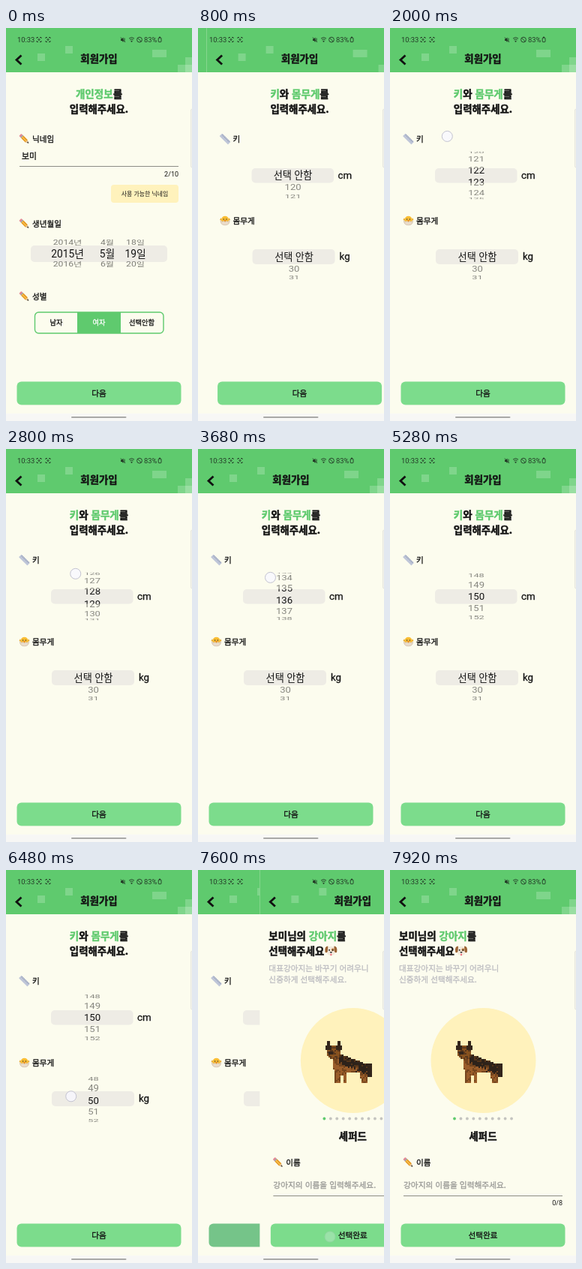
An HTML page that plays this animation: 248 px wide and 524 px high, repeating every 8000 ms.

```html
<!DOCTYPE html>
<html lang="ko">
<head>
<meta charset="utf-8">
<style>
html, body { margin: 0; width: 100%; height: 100%; overflow: hidden; background: #fcfcee; }
svg { display: block; width: 248px; height: 524px; font-family: "Noto Sans CJK KR", "Noto Sans CJK", sans-serif; }
text { stroke-width: 0; stroke-linejoin: round; }
.num { font-family: Roboto, "Noto Sans CJK KR", "Noto Sans CJK", sans-serif; }
.mid { text-anchor: middle; }
.end { text-anchor: end; }
.semi { stroke-width: .3px; }
.heavy { font-weight: 700; stroke-width: .45px; }
</style>
</head>
<body>
<svg id="stage" viewBox="0 0 248 524"></svg>
<script>
const LOOP = 8000, GREEN = '#5fca6e', BUTTON = '#7cdc8c', PRESSED = '#75c489';
const INK = '#141414', PALE = '#fff2bc', BOX = '#eeece5';
const stage = document.getElementById('stage');
const el = id => document.getElementById(id);
const clamp = v => Math.min(1, Math.max(0, v));
const easeOut = (v, power) => 1 - (1 - clamp(v)) ** power;
const range = (n, fn) => Array.from({ length: n }, (_, i) => fn(i)).join('');

const text = (x, y, size, str, cls = '', fill = INK) =>
  `<text x="${x}" y="${y}" font-size="${size}" class="${cls}" fill="${fill}" stroke="${fill}">${str}</text>`;
const accent = str => `<tspan fill="${GREEN}" stroke="${GREEN}">${str}</tspan>`;
const rect = (x, y, w, h, fill, r = 0, attrs = '') =>
  `<rect x="${x}" y="${y}" width="${w}" height="${h}" rx="${r}" fill="${fill}" ${attrs}/>`;
const path = (d, fill, attrs = '') => `<path d="${d}" fill="${fill}" ${attrs}/>`;
const dot = (x, y, r, fill) => `<circle cx="${x}" cy="${y}" r="${r}" fill="${fill}"/>`;

// Small pictures
const pencil = y => `<g transform="translate(24.5 ${y}) rotate(45)">
  ${rect(-8, -2.2, 3, 4.4, '#e58a94', 1)}${rect(-5.5, -2.2, 1.5, 4.4, '#9aa3ab')}${rect(-4, -2.2, 8, 4.4, '#e5951f')}
  ${rect(-4, -.6, 8, 1.4, '#f9c552')}${path('M4-2.2L8 0L4 2.2Z', '#e0bf94')}${path('M6-1.1L8.3 0L6 1.1Z', '#222')}</g>`;
const ruler = `<g transform="translate(24.5 148) rotate(45)">${rect(-8, -2.5, 16, 5, '#bfc6d8', .5)}
  ${range(7, i => rect(-6.3 + 2 * i, -2.5, .6, 2, '#7b86a2'))}</g>`;
const chick = dot(24.5, 255.5, 4.8, '#f9bd33') + dot(22.6, 255, .7, '#333') + dot(26.4, 255, .7, '#333') +
  path('M23.3 256.3h2.4l-1.2 1.8Z', '#e5681d') + path('M19 253l-1.5 3 3 1ZM30 253l1.5 3-3 1Z', '#e9a827') +
  path('M18.5 257l2 1.6 2-1.4 2 1.4 2-1.4 2 1.4 2-1.6q0 5.8-6 5.8t-6-5.8', '#eadccb', 'stroke="#bfa78c" stroke-width=".5"');
const puppy = dot(95, 108, 6.2, '#f3eadc') + path('M91 101.5q-5 0-3.8 8 2 2 3.3-1ZM99 101.5q5 0 3.8 8-2 2-3.3-1Z', '#9a6233') +
  dot(97.4, 106.3, 2, '#c98f52') + dot(92.7, 106.8, 1, '#222') + dot(97.3, 106.8, 1, '#222') +
  path('M93.2 109h3.6l-1.8 2Z', '#222') + rect(94, 111.4, 2, 2.8, '#ee6b7b', 1);

// Shepherd on a grid of 2px cells: sloping back, dark saddle, tan chest and legs
function shepherd() {
  let out = '', seed = 7;
  const noise = () => (seed = seed * 16807 % 2147483647) / 2147483647;
  const cell = (x, y) => {
    const grain = noise(), back = 8 + Math.max(0, x - 9) * .38;
    const ear = y < 6 && Math.min(Math.abs(x - 1.5), Math.abs(x - 8.5)) <= .5 + y / 3;
    const head = ((x - 5) / 5) ** 2 + ((y - 7) / 4.4) ** 2 < 1;
    const belly = x < 14 ? 22 : 20;
    const body = x > 4 && x < 30 && y >= back && y <= belly && x > 4 + (y - 16) / 3;
    const front = (x > 5 && x < 10) || (x > 11 && x < 14);
    const hind = x > 22 + Math.max(0, y - 22) / 3 && x < 28;
    const leg = y > 18 && y < 28 && (front || hind);
    const tail = x > 27 && x < 31 && y > 14 && y < 24;
    if (!(ear || head || body || leg || tail)) return '';
    if (ear || tail || (head && Math.abs(x - 3) < 1.5 && y > 6 && y < 9)) return '#33251b';
    if (head) return grain < .3 ? '#5a381d' : '#87521f';
    if (x > 8 && y < back + 4 + 4 * grain) return grain < .25 ? '#553519' : '#2d221a';
    return grain < .35 ? '#74451e' : '#9a5d2a';
  };
  for (let y = 0; y < 28; y++) for (let x = 0; x < 31; x++) {
    const fill = cell(x, y);
    if (fill) out += rect(88 + 2 * x, 228 + 2 * y, 2, 2, fill);
  }
  return `<g shape-rendering="crispEdges">${out}</g>`;
}

// Screens
const tile = (x, y, w, h) => rect(x, y, w, h, '#fff', 0, 'opacity=".2"');
const screen = (id, action, content) => `<g id="${id}">${rect(0, 0, 248, 524, '#fcfcee')}${rect(0, 0, 248, 59, GREEN)}
  ${tile(42, 34, 10, 10)}${tile(79, 24, 10, 10)}${tile(195, 29, 19, 10)}${tile(229, 49, 19, 10)}${tile(239, 39, 9, 20)}
  ${path('M20.5 36.5L14 42.5L20.5 48.5', 'none', 'stroke="#111" stroke-width="2.8"')}
  ${text(124, 45.7, 13.4, '회원가입', 'mid heavy')}${content}
  ${rect(14.5, 471.5, 219, 31, BUTTON, 6, `id="${id}Button"`)}${text(124, 491, 10.6, action, 'mid semi')}</g>`;
const heading = (a, b, x = 124, cls = 'mid heavy') => text(x, 92.8, 13.5, a, cls) + text(x, 112.8, 13.4, b, cls);
const label = (y, str) => text(35, y, 10.6, str, 'semi');
const rule = y => rect(18, y, 212, 1, '#8d8d86');
const counter = (y, str) => text(230, y, 9, str, 'end num');
const dateColumn = (x, value, unit) => range(3, i => `<g transform="translate(${x} ${286 + i * 14.7}) ${i === 1 ? '' : 'scale(.88 .6)'}"
  opacity="${i === 1 ? 1 : .55}">${text(0, 4.9, 13.8, value + i - 1 + unit, 'mid num')}</g>`);
const choice = (i, str) => text(67 + 57 * i, 396, 9.2, str, 'mid semi', i === 1 ? '#fff' : INK);

const profile = heading(accent('개인정보') + '를', '입력해주세요.') +
  pencil(148) + label(152, '닉네임') + text(21, 175, 10.8, '보미', 'semi') + rule(184) + counter(198, '2/10') +
  rect(140, 209, 90, 24, PALE, 4) + text(185, 224, 7.9, '사용 가능한 닉네임', 'mid') +
  pencil(261) + label(265, '생년월일') + rect(33, 290, 182, 22, BOX, 5) +
  dateColumn(82, 2015, '년') + dateColumn(135, 5, '월') + dateColumn(172.5, 19, '일') +
  pencil(358) + label(362, '성별') + rect(38.5, 379, 171.5, 28, 'none', 5, `stroke="${GREEN}" stroke-width="1.4"`) +
  rect(95, 379, 58, 28, GREEN) + ['남자', '여자', '선택안함'].map((str, i) => choice(i, str)).join('');

const size = heading(`${accent('키')}와 ${accent('몸무게')}를`, '입력해주세요.') +
  ruler + label(152, '키') + rect(60, 187, 109.5, 19.5, BOX, 5) + text(175, 201, 13.3, 'cm', 'num semi') +
  chick + label(261, '몸무게') + rect(61, 295, 110, 20, BOX, 5) + text(177, 309, 13.3, 'kg', 'num semi') +
  '<g id="height" transform="translate(115 196.5)"></g><g id="weight" transform="translate(116.5 305)"></g>';

const pet = heading(`보미님의 ${accent('강아지')}를`, '선택해주세요', 12, 'heavy') + puppy +
  text(12, 135, 10.65, '대표강아지는 바꾸기 어려우니', 'semi', '#bdbdc1') +
  text(12, 150, 10.65, '신중하게 선택해주세요.', 'semi', '#bdbdc1') +
  dot(124.5, 254, 70, PALE) + shepherd() + range(10, i => dot(86 + i * 8.45, 331.5, 1.9, i ? '#c4c4c0' : GREEN)) +
  text(124, 360, 13.4, '셰퍼드', 'mid heavy') + pencil(390) + label(394, '이름') +
  text(18, 424, 10.7, '강아지의 이름을 입력해주세요.', 'semi', '#9b9b98') + rule(434) + counter(447, '0/8');

const scanIcon = x => path(`M${x - 3} 14v-1.5h2M${x + 1} 12.5h2V14M${x + 3} 17v1.5h-2M${x - 1} 18.5h-2V17`, 'none') + dot(x, 15.5, 1, 'none');
const status = `<g opacity=".8">${text(15, 19, 9.4, '10:33', 'num')}${text(184, 19, 9.4, '83%', 'num')}
  <g stroke="${INK}" stroke-width=".9">${scanIcon(44)}${scanIcon(56)}${dot(178, 15.6, 3.4, 'none')}
  ${path('M164 14q3.5-3 7 0M165.3 15.8q2.2-2 4.4 0M153 12.5l6 6.5M158 13.5v4M175.5 13.2l4.8 4.8', 'none')}
  ${rect(203.2, 13, 3.8, 5.6, 'none', .8)}</g>
  ${path('M153 14.5h1.5l2-2v6.5l-2-2H153Z', INK)}${dot(167.5, 17.7, 1, INK)}${rect(204, 11.7, 2, 1.5, INK)}</g>`;

stage.innerHTML = `<defs><clipPath id="inside"><rect x="-55" y="-9.7" width="110" height="19.6"/></clipPath>
  <clipPath id="outside"><path d="M-55-32h110v22.3h-110ZM-55 9.9h110v22h-110Z"/></clipPath></defs>
  ${screen('profile', '다음', profile)}${screen('size', '다음', size)}${screen('pet', '선택완료', pet)}
  ${status}${rect(0, 514, 248, 10, '#f7f7f5')}${rect(87, 518, 73.5, 2, '#a9a9a7', 1)}
  ${rect(246.4, 108, 4, 78, '#f2f2eb', 2, 'stroke="#d8d8d4" stroke-width=".6"')}
  <circle id="touch" r="7" fill="#f8f8ff" fill-opacity=".8" stroke="#c3c3d0"/>`;

// Each wheel is flicked `count` times, one flick every `step` ms; the finger swipes for `hold` ms
const wheels = [
  { id: 'height', first: 120, start: 1813, step: 904, count: 4, rows: 7.75, time: 740, hold: 190, from: [106, 184], to: [76, 144] },
  { id: 'weight', first: 30, start: 5440, step: 390, count: 3, rows: 7, time: 300, hold: 280, from: [97, 340], to: [86, 299] }
];
const slides = [{ id: 'size', button: 'profileButton', press: 480, start: 545 }, { id: 'pet', button: 'sizeButton', press: 7280, start: 7478 }];

function drawWheel({ id, first, start, step, count, rows, time }, t) {
  let row = 0, items = '';
  for (let i = 0; i < count; i++) row += rows * easeOut((t - start - i * step) / time, 2);
  for (let i = Math.max(0, Math.ceil(row - 3)); i <= row + 3; i++) {
    const a = (i - row) * .509;
    items += `<g transform="translate(0 ${32.4 * Math.sin(a)}) scale(${.93 + .07 * Math.cos(a)} ${Math.cos(a)})">
      ${text(0, 4.7, 13.2, i ? first + i - 1 : '선택 안함', 'mid num')}</g>`;
  }
  el(id).innerHTML = `<g clip-path="url(#outside)" opacity=".5">${items}</g><g clip-path="url(#inside)">${items}</g>`;
}

function drawTouch(t) {
  let x = 176, y = 489, alpha = 0;
  const fade = late => 1 - clamp(late / 120);
  for (const { press, start } of slides)
    if (t >= press) alpha = fade(t - start - 40);
  for (const { start, step, count, hold, from, to } of wheels) {
    const i = Math.min(count - 1, Math.floor((t - start) / step)), age = t - start - i * step, u = clamp(age / hold);
    if (i < 0 || age > hold + 120) continue;
    [x, y] = from.map((v, k) => v + (to[k] - v) * u);
    alpha = fade(age - hold);
  }
  for (const [name, value] of Object.entries({ cx: x, cy: y, opacity: alpha })) el('touch').setAttribute(name, value);
}

function draw() {
  const t = performance.now() % LOOP;
  for (const { id, button, press, start } of slides) {
    el(id).setAttribute('transform', `translate(${248 * (1 - easeOut((t - start) / 400, 3))} 0)`);
    el(button).setAttribute('fill', t > press ? PRESSED : BUTTON);
  }
  for (const wheel of wheels) drawWheel(wheel, t);
  drawTouch(t);
  requestAnimationFrame(draw);
}
draw();
</script>
</body>
</html>
```
